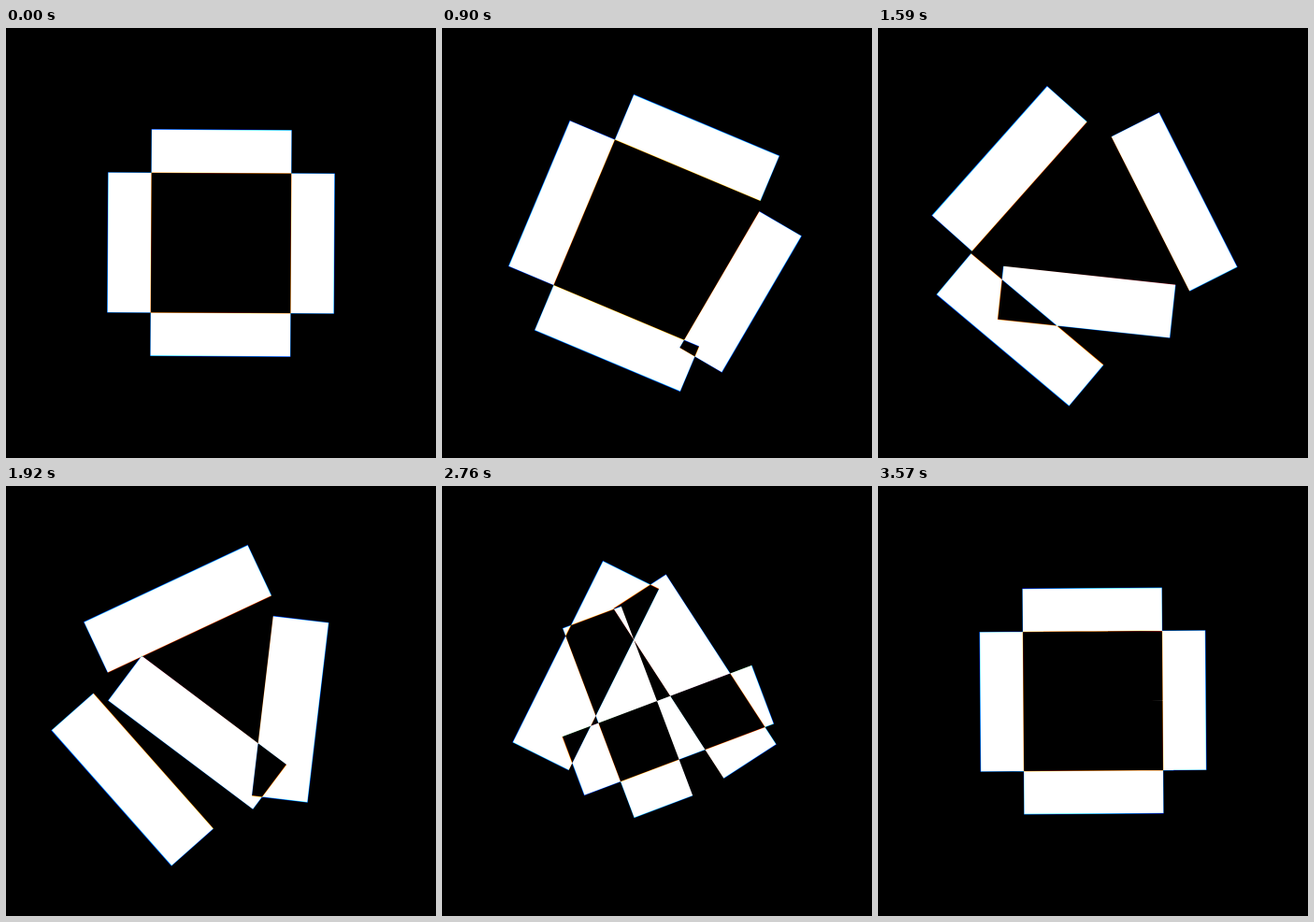
Recreate the animation shown at these times as an HTML page with a canvas. Size 460 px wide and 460 px high, loop 3600 ms.

```html
<!DOCTYPE html>
<html lang="en">
<head>
<meta charset="utf-8">
<title>Golden bars</title>
<style>
  html, body { margin: 0; height: 100%; overflow: hidden; background: #000; }
  canvas { display: block; }
</style>
</head>
<body>
<canvas id="stage" width="460" height="460"></canvas>
<script>
const ctx = document.getElementById('stage').getContext('2d');
const LOOP = 3600, PHASE = 12;
const PHI = (1 + Math.sqrt(5)) / 2;
const LENGTH = 149.5, WIDTH = LENGTH / (2 * PHI);
const OUTER = (LENGTH + WIDTH) / 2, INNER = WIDTH / 2;
const START = 612, STAGGER = 428, DURATION = 1700;

// Slightly different sizes per channel give the coloured fringes.
const CHANNELS = [['#f00', 0.997], ['#0f0', 1], ['#00f', 1.003]];

const smooth = u => {
  u = Math.min(1, Math.max(0, u));
  return u * u * (3 - 2 * u);
};

// Four bars, in the order right, top, left, bottom, each swinging a quarter turn inwards.
function barsPath(time) {
  const path = new Path2D();
  for (let i = 0; i < 4; i++) {
    const swing = smooth((time - START - i * STAGGER) / DURATION);
    const radius = OUTER + (INNER - OUTER) * swing;
    const bar = new Path2D();
    bar.rect(radius - WIDTH / 2, -LENGTH / 2, WIDTH, LENGTH);
    path.addPath(bar, new DOMMatrix().rotate(90 * (swing - i)));
  }
  return path;
}

function draw(now) {
  const time = (now + PHASE) % LOOP;
  const progress = time / LOOP;
  const path = barsPath(time);

  ctx.globalCompositeOperation = 'source-over';
  ctx.fillStyle = '#000';
  ctx.fillRect(0, 0, 460, 460);
  ctx.globalCompositeOperation = 'lighter';
  for (const [color, spread] of CHANNELS) {
    const scale = PHI ** progress * spread;
    ctx.save();
    ctx.translate(230, 230);
    ctx.rotate(progress * Math.PI / 2);
    ctx.scale(scale, scale);
    ctx.fillStyle = color;
    ctx.fill(path, 'evenodd');
    ctx.restore();
  }
}

function tick() {
  draw(performance.now());
  requestAnimationFrame(tick);
}
tick();
</script>
</body>
</html>
```
